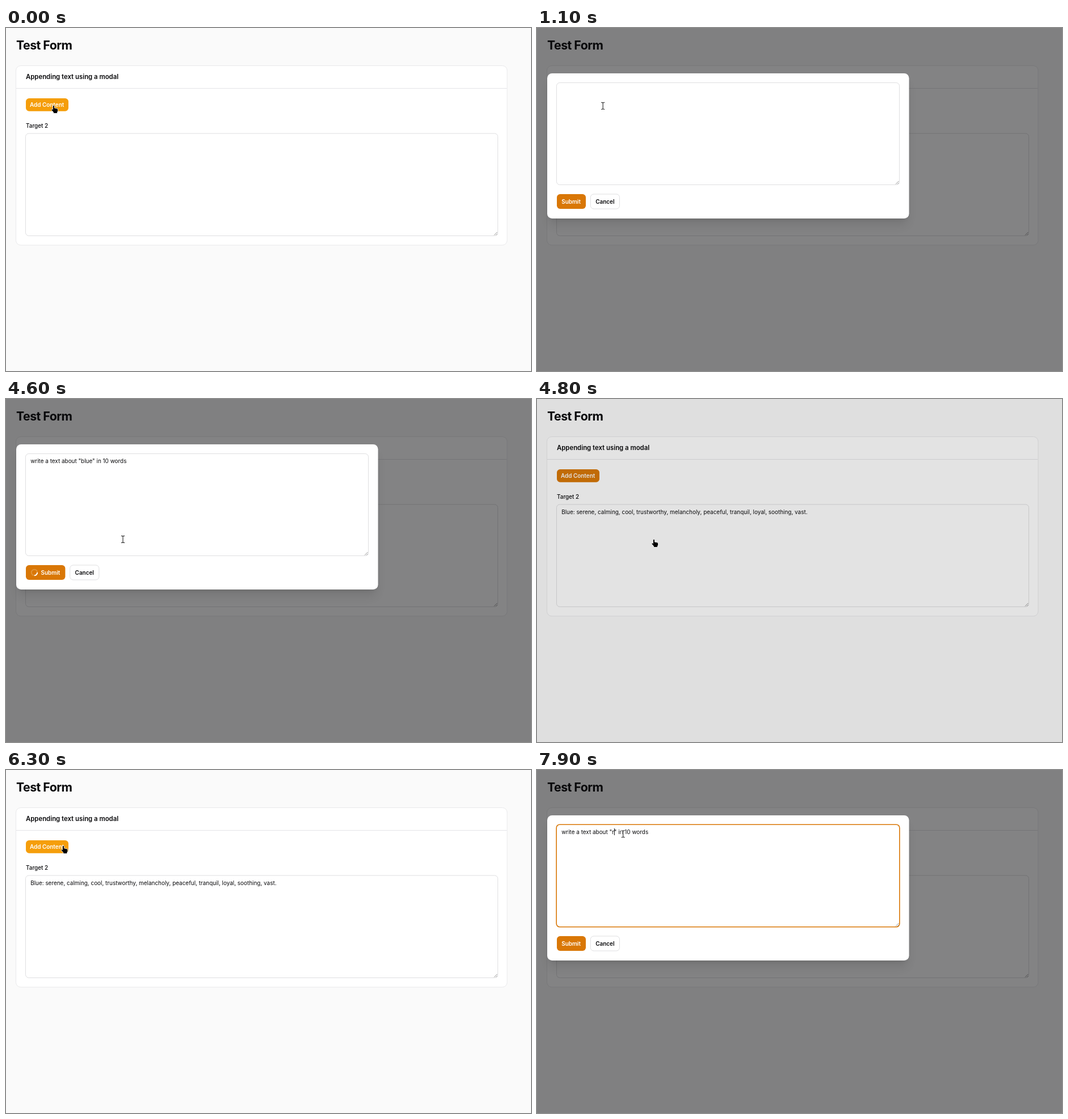
An HTML page that plays this animation: 925x605 px, repeating every 8000 ms.

```html
<!DOCTYPE html>
<html lang="en">
<head>
<meta charset="utf-8">
<title>Test Form</title>
<style>
  html, body { margin: 0; width: 100%; height: 100%; overflow: hidden; background: #fafafa; }
  svg { display: block; width: 925px; height: 605px; }
  text { font: 400 9.93px Inter, "Liberation Sans", sans-serif; fill: #09090b; white-space: pre; }
  .title { font-size: 21.3px; font-weight: 700; letter-spacing: -.025em; }
  .heading { font-size: 11.36px; font-weight: 600; }
  .label { font-weight: 500; }
  .btn { font-weight: 600; }
  .light { fill: #fff; }
  .field { fill: #fff; stroke: #dfdfe1; }
  .far { opacity: .1; filter: blur(8.9px); }
  .near { opacity: .1; filter: blur(3.6px); }
  #modal { transform-origin: 336.75px 208px; }
</style>
</head>
<body>
<svg viewBox="0 0 925 605">
  <defs>
    <path id="grip" fill="none" stroke="#777" stroke-width=".8" d="M-6.5-1L-1-6.5M-3.3-1L-1-3.3"/>
    <path id="bar" fill="none" d="M-2.5-6H-1Q0-6 0-5V5Q0 6-1 6H-2.5M2.5-6H1Q0-6 0-5M0 5Q0 6 1 6H2.5"/>
  </defs>

  <rect width="925" height="605" fill="#fafafa"/>
  <text class="title" x="18" y="38.2">Test Form</text>
  <rect x="17.5" y="66.5" width="865.5" height="316.5" rx="8.5" fill="#fff" stroke="#e9e9eb"/>
  <path d="M18 106.5H882.5" stroke="#e4e4e7"/>
  <text class="heading" x="35" y="90.2">Appending text using a modal</text>
  <rect id="add" x="35" y="124" width="75" height="22.7" rx="5.7"/>
  <text class="btn light" x="42" y="138.8">Add Content</text>
  <text class="label" x="35" y="175.7">Target 2</text>
  <rect class="field" x="34.5" y="186" width="832" height="180.5" rx="5.7"/>
  <use href="#grip" x="866.5" y="366.5"/>
  <text id="result" x="43.2" y="202.8">Blue: serene, calming, cool, trustworthy, melancholy, peaceful, tranquil, loyal, soothing, vast.</text>

  <rect id="shade" width="925" height="605" fill="#09090b"/>

  <g id="modal">
    <rect class="far" x="21.6" y="97.8" width="630.3" height="248.8" rx="6"/>
    <rect class="near" x="22.3" y="90" width="629" height="247.4" rx="6"/>
    <rect x="18" y="80" width="637.5" height="256" rx="8.5" fill="#fff"/>
    <rect class="field" x="34.5" y="96.5" width="604" height="180" rx="5.7"/>
    <rect id="ring" x="34.2" y="96.2" width="604.6" height="180.6" rx="5.7" fill="none" stroke="#d97706" stroke-width="1.6"/>
    <use href="#grip" x="638.5" y="276.5"/>
    <rect id="mark" y="102" height="15" fill="#b3d7ff"/>
    <text id="prompt" x="43.2" y="113.1"></text>
    <rect id="caret" y="103" width="1" height="12" fill="#09090b"/>
    <rect id="submit" x="35" y="293" width="51" height="26" rx="5.7"/>
    <g id="spinner" fill="none" stroke="#fff" stroke-width="2">
      <circle r="5.2" opacity=".2"/>
      <path d="M-5.2 0A5.2 5.2 0 0 1 0-5.2"/>
    </g>
    <text id="submitText" class="btn light" x="43.2" y="309.5">Submit</text>
    <g id="cancel">
      <rect class="field" x="94.3" y="293" width="51.2" height="26" rx="5.7"/>
      <text class="btn" x="103.2" y="309.5">Cancel</text>
    </g>
  </g>

  <path id="hand" stroke="#fff" stroke-width=".8" stroke-linejoin="round"
    d="M-1.6.8Q0-.9 1.4.8V4.6L6 5.4Q7.6 5.8 7.5 7.6V10.2L6.4 12V14H-.4V12.3L-3.9 8.2Q-4.2 6.3-2.5 6.5L-1.6 7.2Z"/>
  <g id="beam" stroke-linecap="square">
    <use href="#bar" stroke="#fff" stroke-width="2.4"/>
    <use href="#bar" stroke="#111"/>
  </g>
</svg>

<script>
  const LOOP = 8000, STEP = 100;
  const OPENS = [662, 6362], CLOSE = 4700;
  const TEXT = 'write a text about "blue" in 10 words', WORD = 'blue';
  const GROW = 18.4; // room the spinner takes in the button

  const $ = id => document.getElementById(id);
  const show = (id, on) => $(id).setAttribute('visibility', on ? 'inherit' : 'hidden');
  const set = (id, attrs) => { for (const k in attrs) $(id).setAttribute(k, attrs[k]); };
  const within = (t, a, b) => t >= a && t < b;
  const glide = k => k * k * (3 - 2 * k);

  // pointer moves: start, end, x, y
  const HOME = [84, 136.5];
  const MOVES = [
    [550, 800, 100.7, 135.3], [800, 1500, 140, 140.5], [1900, 2200, 139.5, 246],
    [2500, 3400, 62, 305], [3900, 4600, 206, 247.5], [4850, 5600, 101.3, 133.5],
    [6400, 7500, 151.7, 112.8]
  ];

  function pointAt(t) {
    return MOVES.reduce(([px, py], [a, b, x, y]) => {
      const k = glide(Math.min(1, Math.max(0, (t - a) / (b - a))));
      return [px + (x - px) * k, py + (y - py) * k];
    }, HOME);
  }

  // fades in at each opening and out at the close
  function fader(id, delay, fadeOut, off, on) {
    const key = (at, props) => ({ offset: at / LOOP, easing: 'cubic-bezier(.4, 0, .2, 1)', ...props });
    const [first, second] = OPENS.map(at => [key(at + delay, off), key(at + delay + 300, on)]);
    const frames = [key(0, off), ...first, key(CLOSE, on), key(CLOSE + fadeOut, off), ...second, key(LOOP, on)];
    const anim = $(id).animate(frames, { duration: LOOP, fill: 'both' });
    anim.pause();
    return anim;
  }

  const faders = [
    fader('shade', 0, 200, { opacity: 0 }, { opacity: .5 }),
    fader('modal', 17, 0, { opacity: 0, transform: 'scale(.95)' }, { opacity: 1, transform: 'scale(1)' })
  ];

  const textX = count => 43.2 + (count ? $('prompt').getSubStringLength(0, count) : 0);

  function drawPrompt(t) {
    const pasted = within(t, 1800, CLOSE) || t >= 7100;
    const retyped = t >= 7900;
    const picking = within(t, 7500, 7900);
    const focus = within(t, 1300, 3400) || t >= 6900;
    const word = TEXT.indexOf(WORD);
    const content = !pasted ? '' : retyped ? TEXT.replace(WORD, 'r') : TEXT;
    $('prompt').textContent = content;
    show('ring', focus);

    const blink = t < 1800 || (t - 1800) % 1200 < 600 || t >= 6900;
    show('caret', focus && blink && !picking);
    set('caret', { x: textX(retyped ? word + 1 : content.length) });

    const marked = picking && t >= 7700;
    show('mark', marked);
    if (marked) set('mark', { x: textX(word), width: textX(word + WORD.length) - textX(word) });
  }

  function drawButtons(t, hovered) {
    const busy = within(t, 3500, CLOSE), shift = busy ? GROW : 0;
    for (const id of ['add', 'submit']) set(id, { fill: id === hovered ? '#f59e0b' : '#d97706' });
    set('submit', { width: 51 + shift });
    for (const id of ['submitText', 'cancel']) set(id, { transform: `translate(${shift} 0)` });
    show('spinner', busy);
    set('spinner', { transform: `translate(50 306) rotate(${(t - 3500) * .36 + 144})` });
  }

  function isOver(id, [x, y]) {
    const b = $(id).getBBox();
    return within(x, b.x, b.x + b.width) && within(y, b.y, b.y + b.height);
  }

  const start = performance.now();
  function draw(now) {
    // the screen refreshes ten times a second
    const t = Math.floor(Math.max(0, now - start) % LOOP / STEP) * STEP;
    const open = within(t, OPENS[0], CLOSE) || t >= OPENS[1];
    const point = pointAt(t);
    const button = open ? 'submit' : 'add';
    const hovered = isOver(button, point) ? button : '';
    const hand = hovered || within(t, CLOSE, CLOSE + 200);

    faders.forEach(a => { a.currentTime = t; });
    drawPrompt(t);
    drawButtons(t, hovered);
    show('result', t >= CLOSE);
    show('hand', hand);
    show('beam', !hand);
    for (const id of ['hand', 'beam']) set(id, { transform: `translate(${point.join(' ')})` });
    requestAnimationFrame(draw);
  }
  draw(start);
</script>
</body>
</html>
```
